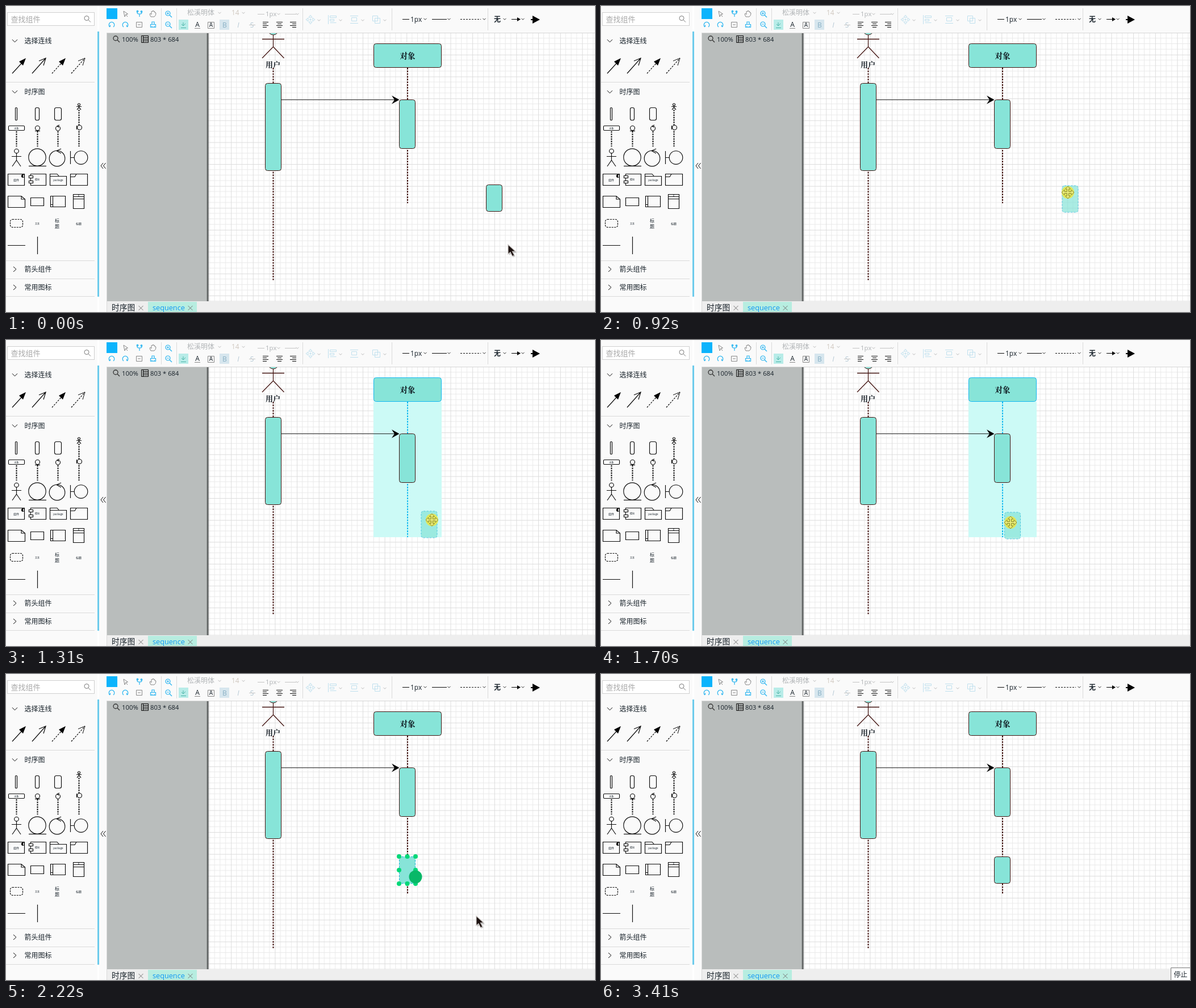
Recreate the animation shown at these times as an HTML page. Size 1037 by 540 pixels, loop 3.48 s.

```html
<!DOCTYPE html>
<html lang="zh-CN">
<head>
<meta charset="utf-8">
<title>Sequence diagram editor</title>
<style>
html, body { margin: 0; width: 100%; height: 100%; overflow: hidden; background: #fff; }
svg { display: block; width: 1037px; height: 540px; }
text { font: 12px 'Open Sans', 'Noto Sans CJK SC', 'Noto Sans CJK', sans-serif; fill: #18222a; }
.line { fill: none; stroke: #0c0c0c; }
.blue { fill: none; stroke: #28b4f0; stroke-width: 1.2; }
.pale { fill: none; stroke: #bfe0ee; }
.gray { fill: none; stroke: #c4c4c4; }
.mid { stroke: #888; }
.rule { fill: none; stroke: #dadada; }
.shape { fill: #87e4d8; stroke: #431512; }
.life { fill: none; stroke: #431512; stroke-width: 2; stroke-dasharray: 2.9 1.93; }
.dots { stroke-width: 2; stroke-dasharray: 2.6 1.6; }
.tiny { font-size: 5px; text-anchor: middle; }
.label { font: 600 13.5px 'Noto Serif CJK SC', 'Noto Sans CJK SC', 'Noto Sans CJK', serif; fill: #0c141c; text-anchor: middle; }
.active { stroke: #12b8f0; }
.dashed { stroke: #20b4d8; stroke-dasharray: 3.5 2; }
</style>
</head>
<body>
<svg viewBox="0 0 1037 540">
<defs>
  <pattern id="grid" x="357.5" y="47.2" width="38.64" height="38.64" patternUnits="userSpaceOnUse">
    <path d="M9.66 0V38.64M19.32 0V38.64M28.98 0V38.64M0 9.66H38.64M0 19.32H38.64M0 28.98H38.64" stroke="#e9e9e9"/>
    <path d="M.5 0V38.64M0 .5H38.64" stroke="#dcdcdc"/>
  </pattern>
  <linearGradient id="edge"><stop stop-color="#a4a8a7"/><stop offset=".8" stop-color="#484b4b"/></linearGradient>
  <clipPath id="page"><path d="M356 48H1037V521H356Z"/></clipPath>
  <path id="down" d="M-2.5-1.2 0 1.3 2.5-1.2" fill="none"/>
  <path id="fold" d="M-4.5-2.3 0 2.3 4.5-2.3" class="line"/>
  <path id="close" d="M-4-4 4 4M4-4-4 4" fill="none" stroke="#777"/>
  <g id="lens" fill="none"><circle r="4"/><path d="M3 3 7 7"/></g>
</defs>

<!-- Canvas -->
<path d="M178 48H356V521H178Z" fill="#b9bdbc"/>
<path d="M356 48H1037V521H356Z" fill="url(#grid)"/>
<path d="M353 48H356.5V521H353Z" fill="url(#edge)"/>
<g stroke="#333" stroke-width="1.3"><use href="#lens" x="193" y="57"/></g>
<text x="204" y="62.5" style="font-size:11.3px">100%</text>
<path d="M238.5 52.5H250.5V64.5H238.5ZM241 55.5H251M241 58.5H251M241 61.5H251M241.5 52V65" class="line"/>
<text x="254" y="62.5" style="font-size:11.2px">803 * 684</text>

<!-- Diagram -->
<g clip-path="url(#page)">
  <rect id="glow" x="647" y="109" width="120" height="239" fill="#ccfaf6"/>
  <circle cx="470.5" cy="42" r="9" class="shape"/>
  <path d="M470.5 51V72L451 92M470.5 72 489.5 92M451 58.5H490" fill="none" stroke="#431512" stroke-width="1.3"/>
  <path d="M470.5 109V484" class="life"/>
  <path id="lifeline" class="life"/>
  <text x="470" y="107.5" class="label" style="font-size:13px">用户</text>
  <rect x="456.5" y="136.5" width="28" height="154" rx="4" class="shape"/>
  <rect id="object" x="647.5" y="66.5" width="119" height="42" rx="4" class="shape"/>
  <text x="707" y="93" class="label">对象</text>
  <path d="M485 165.5H684" stroke="#222"/>
  <path d="M692.5 165.5 679 158 684 165.5 679 173Z"/>
  <rect x="692.5" y="165.5" width="28" height="86" rx="4" class="shape"/>
  <rect id="block" width="28" height="47" rx="4" class="shape"/>
  <g id="handles" fill="#00d878"></g>
  <circle id="release" cx="721" cy="358" r="11.5" fill="#08b868"/>
</g>

<!-- Toolbar -->
<path d="M164 0H1037V47H178V540H164Z" fill="#fafafa"/>
<path d="M178 47.5H1037M177.5 47V540M273.5 4V43M300.5 4V43M522.5 4V43M679.5 4V43M848.5 4V43" class="rule"/>
<path d="M177 4H196V23H177Z" fill="#0cb4fc"/>
<path d="M207 9 214.5 14 211 15 209 19ZM211 15 214 19" class="gray mid"/>
<g class="blue">
  <path d="M231 9V12Q231 14 235 14V19M239 9V12Q239 14 235 14"/><circle cx="231.5" cy="9.5" r="1.3"/><circle cx="238.5" cy="10" r="1.3"/>
  <path d="M183 37A4.8 4.8 0 1 1 189 37M181 36H183.500V33.500M207 37A4.8 4.8 0 1 1 213 37M215 36H212.500V33.500"/>
  <path d="M254.5 32.5H263.5V37.5H254.5ZM257 32V28H261V32M257 35V38M261 35V38"/>
  <use href="#lens" x="285" y="13"/><use href="#lens" x="285" y="32"/>
  <path d="M283 13H287M285 11V15M283 32H287"/>
</g>
<path d="M255 19Q252 14 254 13L256 15V10Q257 8 258 10V9Q259 7 260 9V10Q261 8 262 10V12Q264 11 264 13Q264 17 261 19Z" class="gray mid"/>
<path d="M229.5 28.5H239.5V37.5H229.5ZM232 33H237" class="gray mid"/>
<g opacity=".32">
  <text x="319" y="15.5">松溪明体</text><text x="397" y="16" style="fill:#7a6048">14</text><text x="457" y="17.5" style="font-size:11.5px">1px</text>
</g>
<path d="M443 14.5H455M491 14.5H511" class="gray"/>
<path d="M304 24H321V42H304Z" fill="#b8ece8"/><path d="M376 24H393V42H376Z" fill="#d6e6ee"/>
<path d="M308 38.5H317M312 29V35M309 32 312 35 316 31" fill="none" stroke="#4cb4a8"/>
<g text-anchor="middle">
  <text x="337" y="37">A</text><text x="361" y="37" style="font-size:10px">A</text>
  <text x="385" y="38" style="fill:#8ab0c4">B</text><text x="409" y="38" style="fill:#b4c8d4;font-style:italic">I</text>
  <text x="433" y="38" style="fill:#b4c8d4">S</text>
</g>
<path d="M332 39.5H342M355.5 28.5H366.5V39.5H355.5Z" class="gray mid"/>
<path d="M428 33.5H439" class="gray"/>
<path d="M452 28.5H462M452 31.5H459M452 34.5H462M452 37.5H459M476 28.5H487M478 31.5H485M476 34.5H487M478 37.5H485M500 28.5H511M504 31.5H511M500 34.5H511M504 37.5H511" class="line"/>
<g class="pale">
  <path d="M536 16 539 20H533ZM536 32 539 28H533ZM528 24 532 21V27ZM544 24 540 21V27ZM534 24H538M536 22V26"/>
  <path d="M567.5 16V32M570.5 17.5H581.5V20.5H570.5ZM570.5 23.5H577.5V26.5H570.5ZM570.5 29.5H581.5"/>
  <path d="M606 17.5H620M608.5 20.5H617.5V26.5H608.5ZM606 30.5H620"/>
  <path d="M645.5 17.5H654.5V26.5H645.5ZM649.5 21.5H658.5V30.5H649.5Z"/>
</g>
<g id="paleChevrons" stroke="#bbb"></g><g id="darkChevrons" stroke="#333"></g>
<path d="M698 23.5H710M750 23.5H776" class="line"/>
<path d="M800 23.5H836" class="line" stroke-dasharray="3 2"/>
<text x="712" y="27.5">1px</text><text x="859" y="28" style="font-weight:bold">无</text>
<path d="M890 23H900V20L906 23.5 900 27V24H890ZM924 23H927V17L940 24 927 31V25H924Z"/>

<!-- Component panel -->
<path d="M0 0H161V540H0Z" fill="#fafafa"/><path d="M161 45H164V513H161Z" fill="#6ccbec"/>
<rect x="2.5" y="11.5" width="153" height="23" fill="#fff" stroke="#cfcfcf"/>
<text x="8.5" y="28" style="font-size:13px;fill:#a8a8a8">查找组件</text>
<g stroke="#777"><use href="#lens" x="142" y="21.5"/></g>
<path d="M0 134.5H156M0 449.5H156M0 481.5H156M0 512.5H156" class="rule"/>
<use href="#fold" x="15.5" y="61.5"/><use href="#fold" x="15.5" y="151.5"/>
<path d="M13 460 18 464.5 13 469M13 492 18 496.5 13 501M171 277 167 282 171 287M175.5 277 171.5 282 175.5 287" class="line"/>
<text x="32.5" y="66">选择连线</text><text x="32.5" y="155.5">时序图</text><text x="32.5" y="469">箭头组件</text><text x="32.5" y="501">常用图标</text>
<path d="M11 119 32 96M46 119 70 92M58 97 70 92 66 105" class="line" stroke-width="1.2"/>
<path d="M81 119 102 96M115 119 139 92" class="line" stroke-width="1.2" stroke-dasharray="3 2"/>
<path d="M127 97 139 92 135 105" class="line"/>
<path d="M35 92 23 98 30 105ZM105 92 93 98 100 105Z"/>
<g class="line" stroke-width="1.15">
  <rect x="16.5" y="179.5" width="3" height="22" rx="1"/><rect x="51.5" y="179.5" width="7" height="22" rx="2.5"/><rect x="85.5" y="179.5" width="12" height="22" rx="3"/>
  <circle cx="128.5" cy="174" r="2"/><path d="M128.5 176V179L125 183M128.5 179 132 183M124 177.5H133"/>
  <path d="M128.5 183V248M18.5 221V248M55.5 221V248M91.5 221V248" class="dots"/>
  <rect x="4.5" y="211.5" width="28" height="8" rx="1.5" fill="#fff"/>
  <circle cx="55.5" cy="215.5" r="4"/><path d="M51 220.5H60"/>
  <circle cx="91.5" cy="216" r="4"/><path d="M94 210 90 212 93 214"/>
  <circle cx="129.5" cy="214.5" r="4" fill="#fafafa"/><path d="M124.5 211V218M124 214.5H126"/>
  <circle cx="18.5" cy="256" r="3.8"/><path d="M18.5 260V272L11 283M18.5 272 26 283M10 265.5H27"/>
  <circle cx="55" cy="267" r="15.2"/><path d="M40 282.5H71"/>
  <circle cx="90" cy="269" r="13.8"/><path d="M97 252 89 255.5 97 260"/>
  <circle cx="132" cy="267.5" r="11.8"/><path d="M113.5 256V279M114 267.5H120"/>
  <path d="M3.5 296.5H32.5V316.5H3.5ZM43.5 296.5H70.5V316.5H43.5Z"/>
  <path d="M40.5 299.5H47.5V303.5H40.5ZM40.5 308.5H47.5V312.5H40.5Z" fill="#fff"/>
  <path d="M77.5 300.5H106.5V316.5H77.5ZM77.5 300V296.5H90L93 300M113.5 296.5H143.5V316.5H113.5ZM113.5 301.5H121L124 296.5"/>
  <path d="M3.5 335.5H27L33.5 341V355.5H3.5ZM27 335.5V341H33M43.5 338.5H66.5V352.5H43.5Z"/>
  <path d="M78.5 335.5H104.5V354.5H78.5ZM82.5 335V355M79 350.5H82M118.5 332.5H137.5V357.5H118.5ZM118 336.5H138M118 340.5H138"/>
  <rect x="7.5" y="376.5" width="22" height="14" rx="4" stroke-dasharray="3 1.5"/>
  <path d="M3 422.5H34M55.5 407V438"/>
</g>
<path d="M30 297A3 3 0 0 0 30 303Z"/><circle cx="30" cy="300" r="2.5" class="line"/>
<text x="18.5" y="217.5" class="tiny" style="font-size:4px">对象</text><text x="18" y="308.5" class="tiny">组件</text><text x="55" y="308" class="tiny" style="font-size:4px">模块</text>
<text x="92" y="309" class="tiny" style="font-size:4.5px">package</text><text x="128" y="335.8" class="tiny" style="font-size:3px">类</text>
<text x="55" y="385.5" class="tiny" style="font-size:4px">文本</text><text x="128" y="386" class="tiny">标题</text>
<text x="90" y="382" class="tiny" style="font-size:8px">标</text><text x="90" y="392" class="tiny" style="font-size:8px">题</text>

<!-- Page tabs -->
<path d="M178 521H1037V540H178Z" fill="#eee"/><path d="M250 522H336V540H250Z" fill="#b7ede0"/>
<text x="186" y="537" style="font-size:13.7px">时序图</text><text x="258" y="537" style="font-size:12.7px;fill:#1098f4">sequence</text>
<use href="#close" x="237.5" y="533"/><use href="#close" x="324.5" y="533"/>

<!-- Pointer and tooltip -->
<g id="tooltip"><path d="M1003.5 518.5H1040V545H1003.5Z" fill="#fff" stroke="#777"/><text x="1008.5" y="535">停止</text></g>
<g id="arrow">
  <path d="M2 2V19L6 15.5 9 22 12.5 20.5 9.5 14.5H15Z" fill="#999" opacity=".6"/>
  <path d="M0 0V17L4 13.5 7.5 20.5 11 19 7.5 12H13Z" fill="#1c1210" stroke="#c8c4c2" stroke-width="1.2"/>
</g>
<g id="mover">
  <circle id="press" r="11" fill="#e0e75a"/>
  <path id="cross" d="M0-11 4.5-6H1.5V-1.5H6V-4.5L11 0 6 4.5V1.5H1.5V6H4.5L0 11-4.5 6H-1.5V1.5H-6V4.5L-11 0-6-4.5V-1.5H-1.5V-6H-4.5Z"/>
</g>
</svg>
<script>
const $ = id => document.getElementById(id);
const show = (id, on) => $(id).style.display = on ? '' : 'none';
const move = (id, [x, y]) => $(id).setAttribute('transform', `translate(${x} ${y})`);
const chevrons = (id, spots) => $(id).innerHTML =
  spots.map(([x, y]) => `<use href="#down" x="${x}" y="${y}"/>`).join('');

chevrons('paleChevrons', [[376, 12], [418, 12], [480, 14], [513, 14], [551, 25], [589, 25], [628, 25], [667, 25]]);
chevrons('darkChevrons', [[738, 23], [780, 23], [842, 23], [878, 23], [910, 23]]);

for (const x of [692, 706.5, 721])
  for (const y of [322, 346, 370])
    if (x !== 706.5 || y !== 346) $('handles').innerHTML += `<circle cx="${x}" cy="${y}" r="4"/>`;

// Keys are [tick, x, y]; a tick is one capture of the screen.
const pointerKeys = [[0, 884, 421], [2, 862, 352], [3, 852, 337], [5, 857, 331], [6, 848, 336], [8, 796, 322],
  [9, 759.5, 316], [13, 721, 322], [15, 721, 344], [16, 721, 358], [17, 828, 427], [21, 945, 467], [22, 971, 497], [25, 1018, 527]];
const blockKeys = [[5, 845.5, 315.5], [6, 836, 320], [7, 812, 317], [8, 787.5, 309.5], [9, 750.5, 303],
  [10, 731, 302], [13, 710.5, 304], [15, 710.5, 320], [16, 692.5, 322.5]];

function along(keys, tick) {
  const next = keys.findIndex(key => key[0] >= tick);
  if (next <= 0) return keys.at(next).slice(1);
  const a = keys[next - 1], b = keys[next], k = (tick - a[0]) / (b[0] - a[0]);
  return [a[1] + (b[1] - a[1]) * k, a[2] + (b[2] - a[2]) * k];
}

const tickStart = i => i * 130 + (i >= 4 ? 10 : 0) + (i >= 18 ? 20 : 0);

function draw(now) {
  const time = now % 3480;
  let tick = 26;
  while (tickStart(tick) > time) tick--;

  const dragging = tick >= 6 && tick < 16;
  const dropped = tick >= 16;
  const selected = dropped && tick < 19;
  const hovering = tick >= 2 && tick < 6;
  const overLifeline = tick >= 10 && tick < 16;

  const pointer = along(pointerKeys, tick);
  move('arrow', pointer);
  move('mover', pointer);
  show('mover', hovering || dragging);
  show('arrow', (tick < 2 || dropped) && tick < 26);
  show('press', dragging);
  $('cross').setAttribute('fill', dragging ? '#e8ec78' : '#fff');
  $('cross').setAttribute('stroke', dragging ? '#8a8730' : '#222');

  move('block', along(blockKeys, tick));
  $('block').setAttribute('class', 'shape' + (hovering || dragging || selected ? ' dashed' : ''));
  $('block').style.opacity = dragging ? .7 : 1;

  $('lifeline').setAttribute('d', `M707 109V${dropped ? 389 : 348}`);
  $('lifeline').setAttribute('class', 'life' + (overLifeline ? ' active' : ''));
  $('object').setAttribute('class', 'shape' + (overLifeline ? ' active' : ''));
  show('glow', overLifeline);
  show('handles', selected);
  show('release', tick === 16 || tick === 17);
  show('tooltip', tick === 26);
}

const start = performance.now();
function loop() {
  draw(performance.now() - start);
  requestAnimationFrame(loop);
}
loop();
</script>
</body>
</html>
```
